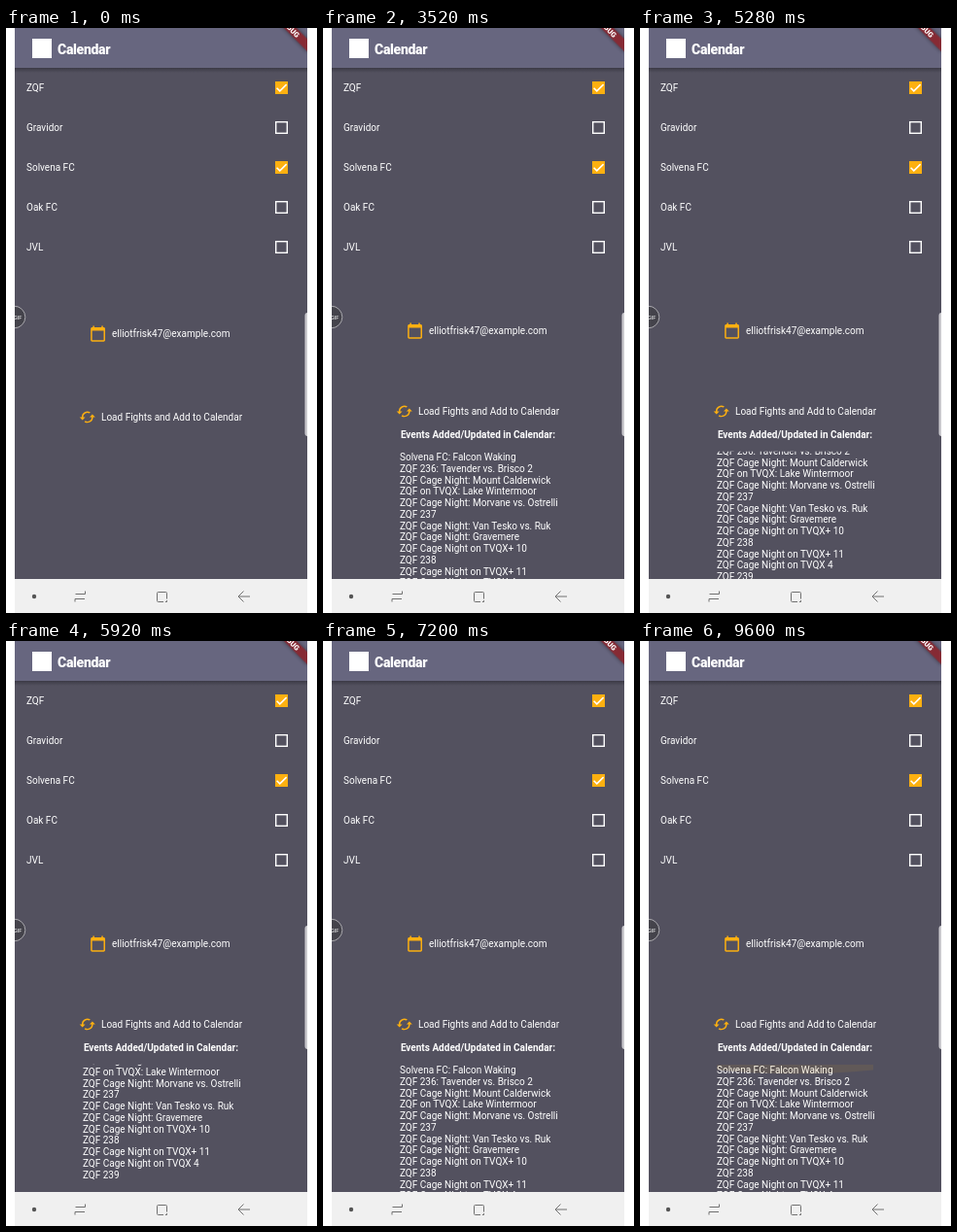
Animation, 320 px wide and 602 px high, one loop 9760 ms. Source, as an HTML page:

```html
<!DOCTYPE html>
<html lang="en">
<head>
<meta charset="utf-8">
<title>Fight calendar app</title>
<style>
  html, body { margin: 0; width: 100%; height: 100%; overflow: hidden; background: #fff; }
  svg { display: block; width: 320px; height: 602px; }
  text { font: 10px Roboto, Arial, sans-serif; fill: #fff; }
  .title { font-size: 14px; font-weight: 900; letter-spacing: -.3px; }
  .bold { font-weight: 700; }
  .banner { font-size: 7.5px; font-weight: 900; }
  .tiny { font-size: 5.5px; }
  .amber { fill: #fdb010; }
  .nav { fill: none; stroke: #707070; }
</style>
</head>
<body>
<svg viewBox="0 0 320 602">
  <defs>
    <clipPath id="screen"><path d="M9 0H310V602H9Z"/></clipPath>
    <clipPath id="listBox"><path d="M78 435.7H242V567H78Z"/></clipPath>
    <linearGradient id="shadow" x2="0" y2="1">
      <stop stop-color="#24232c" stop-opacity=".5"/>
      <stop offset="1" stop-color="#24232c" stop-opacity="0"/>
    </linearGradient>
  </defs>
  <g clip-path="url(#screen)">
    <path fill="#53515f" d="M9 0H310V567H9Z"/>
    <path fill="#67667f" d="M9 0H310V41H9Z"/>
    <path fill="url(#shadow)" d="M9 41H310V46H9Z"/>
    <path fill="#fff" d="M27 11h20v20h-20Z"/>
    <text class="title" x="53" y="27.3">Calendar</text>

    <g transform="translate(292.4 0) rotate(45)">
      <path fill="#862a34" style="filter: drop-shadow(0 0 2px #0007)" d="M-30-4.4H30V4.4H-30Z"/>
      <text class="banner" text-anchor="middle" y="2.7">DEBUG</text>
    </g>

    <g id="rows"></g>

    <g id="account">
      <path class="amber" transform="translate(85.7 305.7) scale(.74)" d="M20 3h-1V1h-2v2H7V1H5v2H4c-1.1 0-2 .9-2 2v16c0 1.1.9 2 2 2h16c1.1 0 2-.9 2-2V5c0-1.1-.9-2-2-2zm0 18H4V8h16v13z"/>
      <text x="109" y="318">elliotfrisk47@example.com</text>
    </g>
    <g id="load">
      <rect id="press" x="67" y="387" width="183" height="27" rx="2" fill="#fff"/>
      <path class="amber" transform="translate(75 391.7) scale(.73)" d="M19 8l-4 4h3a6 6 0 0 1-8.8 5.3l-1.46 1.46A8 8 0 0 0 20 12h3zM6 12a6 6 0 0 1 8.8-5.3l1.46-1.46A8 8 0 0 0 4 12H1l4 4 4-4z"/>
      <text x="98" y="404">Load Fights and Add to Calendar</text>
    </g>

    <g id="results">
      <text class="bold" text-anchor="middle" x="159.5" y="422">Events Added/Updated in Calendar:</text>
      <g clip-path="url(#listBox)">
        <g id="list"></g>
        <path id="glow" fill="#ffb300"/>
      </g>
    </g>

    <circle cx="8.5" cy="297.5" r="11.3" fill="#44434b" stroke="#aaa9ae"/>
    <text class="tiny" x="8" y="299.5">GIF</text>
    <rect x="307.5" y="293" width="8" height="127" rx="3" fill="#c9c8cd"/>

    <path fill="#f0f0f0" d="M9 567H310V602H9Z"/>
    <circle cx="29" cy="585" r="2.2" fill="#555"/>
    <path class="nav" d="M71.5 582.5h10v-3M81 587.5h-10v3M251 585h-12m5.5-5.5l-5.5 5.5 5.5 5.5"/>
    <path class="nav" d="M162 590.5h-5.5a1 1 0 0 1-1-1v-8a1 1 0 0 1 1-1h8a1 1 0 0 1 1 1v6m0 1.5v1.5h-1.5"/>
  </g>
</svg>
<script>
const LOOP = 9760, STEP = 160, LINE = 11.75;
const $ = id => document.getElementById(id);

const leagues = [["ZQF", 1], ["Gravidor"], ["Solvena FC", 1], ["Oak FC"], ["JVL"]];
const events = [
  "Solvena FC: Falcon Waking",
  "ZQF 236: Tavender vs. Brisco 2",
  "ZQF Cage Night: Mount Calderwick",
  "ZQF on TVQX: Lake Wintermoor",
  "ZQF Cage Night: Morvane vs. Ostrelli",
  "ZQF 237",
  "ZQF Cage Night: Van Tesko vs. Ruk",
  "ZQF Cage Night: Gravemere",
  "ZQF Cage Night on TVQX+ 10",
  "ZQF 238",
  "ZQF Cage Night on TVQX+ 11",
  "ZQF Cage Night on TVQX 4",
  "ZQF 239"
];

const checkbox = on => on
  ? `<rect x="277" y="-6.5" width="13" height="13" class="amber"/>
     <path d="M278.6 .2l3.2 3.2 6.8-6.8" fill="none" stroke="#fff" stroke-width="1.5"/>`
  : `<rect x="277.7" y="-5.8" width="11.6" height="11.6" fill="none" stroke="#fff" stroke-width="1.4"/>`;

$("rows").innerHTML = leagues.map(([name, on], i) =>
  `<g transform="translate(0 ${61.5 + 41 * i})"><text x="21" y="3.6">${name}</text>${checkbox(on)}</g>`).join("");
$("list").innerHTML = events.map((name, i) =>
  `<text x="79" y="${445 + LINE * i}">${name}</text>`).join("");

// Each key is [time, value]; values between keys are linear.
const scrollKeys = [[4800, 0], [4960, 1.5], [5280, 18], [5600, 33.5], [5920, 33.5], [6080, 27],
  [6400, 0], [8000, 0], [8320, 33.5], [8480, 33.5], [8640, 27], [8960, 0]];
const glowKeys = [[6240, 0], [6560, 1], [7200, 0], [8800, 0], [9120, 1], [9600, .16], [9760, 0]];
const pressKeys = [[1120, 0], [1280, .06], [1440, .1], [1600, .05], [1760, 0]];

function valueAt(keys, t) {
  const i = keys.findIndex(key => key[0] > t);
  if (i < 0) return keys.at(-1)[1];
  if (i === 0) return keys[0][1];
  const [t0, a] = keys[i - 1], [t1, b] = keys[i];
  return a + (b - a) * (t - t0) / (t1 - t0);
}

const shift = (id, y) => $(id).setAttribute("transform", `translate(0 ${y})`);

function draw(now) {
  const t = Math.floor(now % LOOP / STEP) * STEP;
  const loaded = t >= 2880;
  shift("account", loaded ? -3 : 0);
  shift("load", loaded ? -6 : 0);
  $("results").setAttribute("visibility", loaded ? "visible" : "hidden");
  $("press").setAttribute("opacity", valueAt(pressKeys, t));
  shift("list", -valueAt(scrollKeys, t));

  const glow = valueAt(glowKeys, t), h = 8 + 11 * glow, top = 435.7;
  $("glow").setAttribute("d", `M79 ${top}H240V${top + h * .6}Q160 ${top + h * 1.4} 79 ${top + h * .6}Z`);
  $("glow").setAttribute("opacity", glow * .5);
  requestAnimationFrame(draw);
}
requestAnimationFrame(draw);
</script>
</body>
</html>
```
